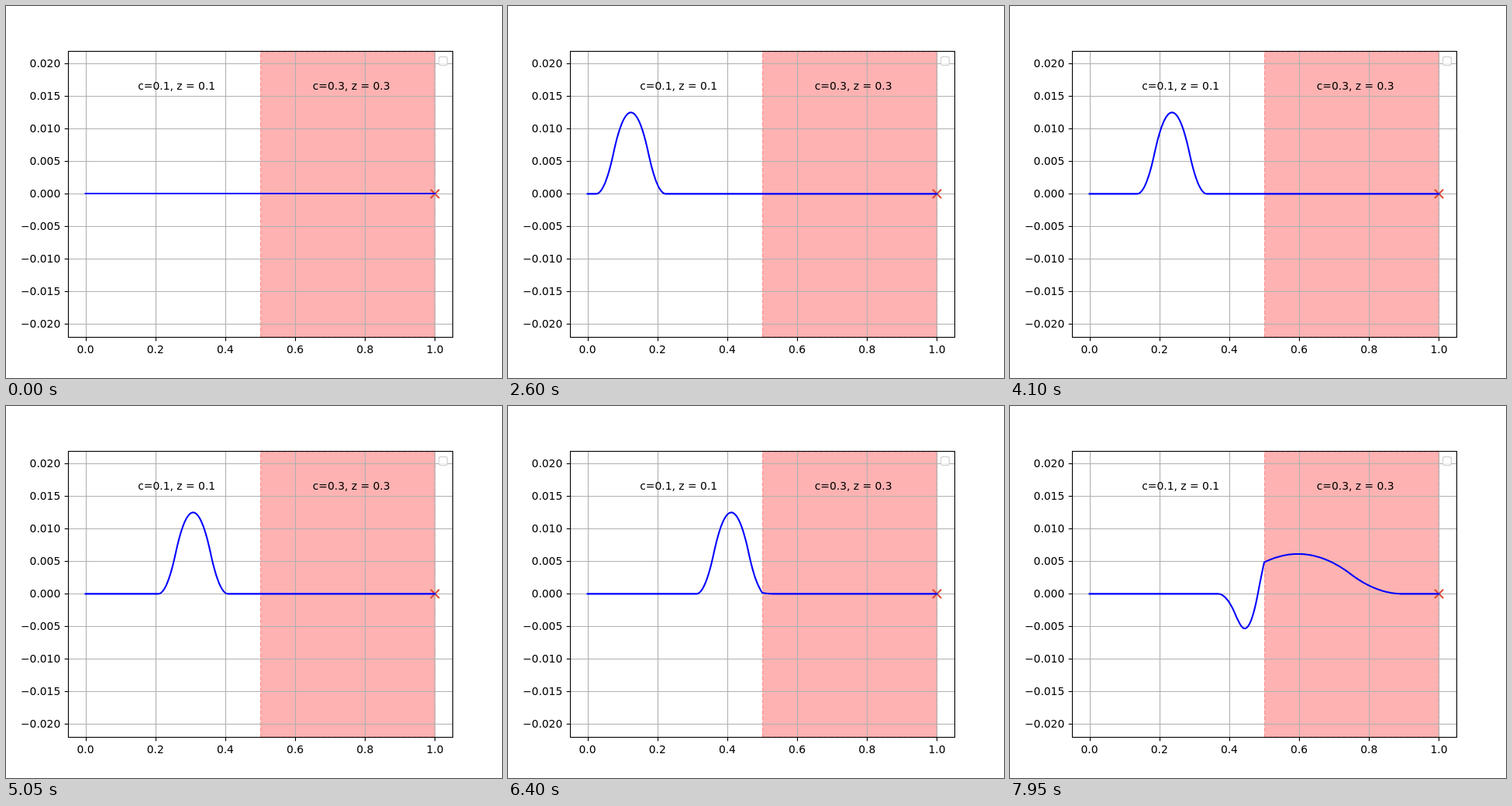
Recreate the animation shown at these times as an HTML page with a canvas. Size 640x480 px, loop 8 s.

```html
<!DOCTYPE html>
<html lang="en">
<head>
<meta charset="utf-8">
<title>Wave at an interface</title>
<style>
html, body { margin: 0; width: 100%; height: 100%; overflow: hidden; background: #fff; }
canvas { display: block; }
</style>
</head>
<body>
<canvas id="stage" width="640" height="480"></canvas>
<script>
const ctx = document.getElementById('stage').getContext('2d');
const PT = 100 / 72;
const LEFT = 80, RIGHT = 576, TOP = 57.6, BOTTOM = 427.2;
const xPix = x => LEFT + (x + 0.05) / 1.1 * (RIGHT - LEFT);
const yPix = u => (TOP + BOTTOM) / 2 - u / 0.044 * (BOTTOM - TOP);
const snap = p => Math.round(p) + 0.5;

const INTERFACE = 0.5, SPEED_RATIO = 3;
const TRANSMIT = 0.49, REFLECT = TRANSMIT - 1;
const HEIGHT = 0.0125, HALF_WIDTH = 0.1;

// Smooth bump made of parabola pieces.
function pulse(d) {
  const r = Math.abs(d) / HALF_WIDTH;
  if (r >= 1) return 0;
  return HEIGHT * (r < 0.5 ? 1 - 2 * r * r : 2 * (1 - r) ** 2);
}

// Pulse released at the fixed left wall, split at the interface; s is the path covered.
function wave(x, s) {
  if (x > INTERFACE)
    return TRANSMIT * pulse(INTERFACE + (x - INTERFACE) / SPEED_RATIO - s);
  return pulse(x - s) - pulse(x + s + 0.0017) + REFLECT * pulse(2 * INTERFACE - x - s);
}

function polyline(points, color, width) {
  ctx.beginPath();
  points.forEach(([x, y]) => ctx.lineTo(x, y));
  ctx.strokeStyle = color;
  ctx.lineWidth = width;
  ctx.stroke();
}

function label(text, x, y, align) {
  ctx.textAlign = align;
  ctx.fillText(text, x, y);
}

function drawRegion() {
  const x0 = snap(xPix(0.5)), x1 = snap(xPix(1)), y0 = snap(TOP), y1 = snap(BOTTOM);
  ctx.fillStyle = 'rgba(255,0,0,0.3)';
  ctx.fillRect(x0, y0, x1 - x0, y1 - y0);
  ctx.setLineDash([3.7 * PT, 1.6 * PT]);
  polyline([[x0, y1], [x0, y0], [x1, y0], [x1, y1], [x0, y1]], 'rgba(255,0,0,0.3)', PT);
  ctx.setLineDash([]);
}

function drawCross() {
  const x = xPix(1), y = yPix(0), r = 5.6;
  polyline([[x - r, y - r], [x + r, y + r]], '#dd4a35', 1.5 * PT);
  polyline([[x - r, y + r], [x + r, y - r]], '#dd4a35', 1.5 * PT);
}

function drawGrid() {
  const width = 0.8 * PT, tick = 3.5 * PT;
  const x0 = snap(LEFT), x1 = snap(RIGHT), y0 = snap(TOP), y1 = snap(BOTTOM);
  ctx.font = `${10 * PT}px "DejaVu Sans", sans-serif`;
  ctx.fillStyle = '#000';
  for (let i = 0; i <= 5; i++) {
    const x = snap(xPix(i / 5));
    polyline([[x, y0], [x, y1]], '#b0b0b0', width);
    polyline([[x, y1], [x, y1 + tick]], '#000', width);
    label((i / 5).toFixed(1), xPix(i / 5), 448, 'center');
  }
  for (let i = -4; i <= 4; i++) {
    const u = i * 0.005, y = snap(yPix(u));
    polyline([[x0, y], [x1, y]], '#b0b0b0', width);
    polyline([[x0 - tick, y], [x0, y]], '#000', width);
    label(u.toFixed(3).replace('-', '\u2212'), LEFT - 2 * tick, Math.round(yPix(u)) + 5, 'right');
  }
}

function drawWave(step) {
  const s = 0.00362 * step + 1.1e-6 * step * step;
  const points = [];
  for (let i = 0; i <= 500; i++)
    points.push([xPix(i / 500), step ? yPix(wave(i / 500, s)) : Math.round(yPix(0))]);
  ctx.lineCap = 'square';
  ctx.lineJoin = 'round';
  polyline(points, '#0000ff', step ? 1.5 * PT : 2);
  ctx.lineCap = 'butt';
  ctx.lineJoin = 'miter';
}

function drawFrame() {
  ctx.strokeStyle = '#000';
  ctx.lineWidth = 0.8 * PT;
  ctx.strokeRect(snap(LEFT), snap(TOP), RIGHT - LEFT, snap(BOTTOM) - snap(TOP));
  ctx.fillStyle = '#000';
  label('c=0.1, z = 0.1', xPix(0.15), 108, 'left');
  label('c=0.3, z = 0.3', xPix(0.65), 108, 'left');

  ctx.beginPath();
  ctx.roundRect(558.5, 65.5, 11, 11, 2.8);
  ctx.fillStyle = 'rgba(255,255,255,0.8)';
  ctx.fill();
  ctx.strokeStyle = 'rgba(204,204,204,0.8)';
  ctx.lineWidth = PT;
  ctx.stroke();
}

function render(now) {
  const t = now % 8000;
  const step = Math.max(0, Math.floor((t - 900) / 50));
  ctx.fillStyle = '#fff';
  ctx.fillRect(0, 0, 640, 480);
  drawRegion();
  drawCross();
  drawGrid();
  drawWave(step);
  drawFrame();
  requestAnimationFrame(render);
}
requestAnimationFrame(render);
</script>
</body>
</html>
```
